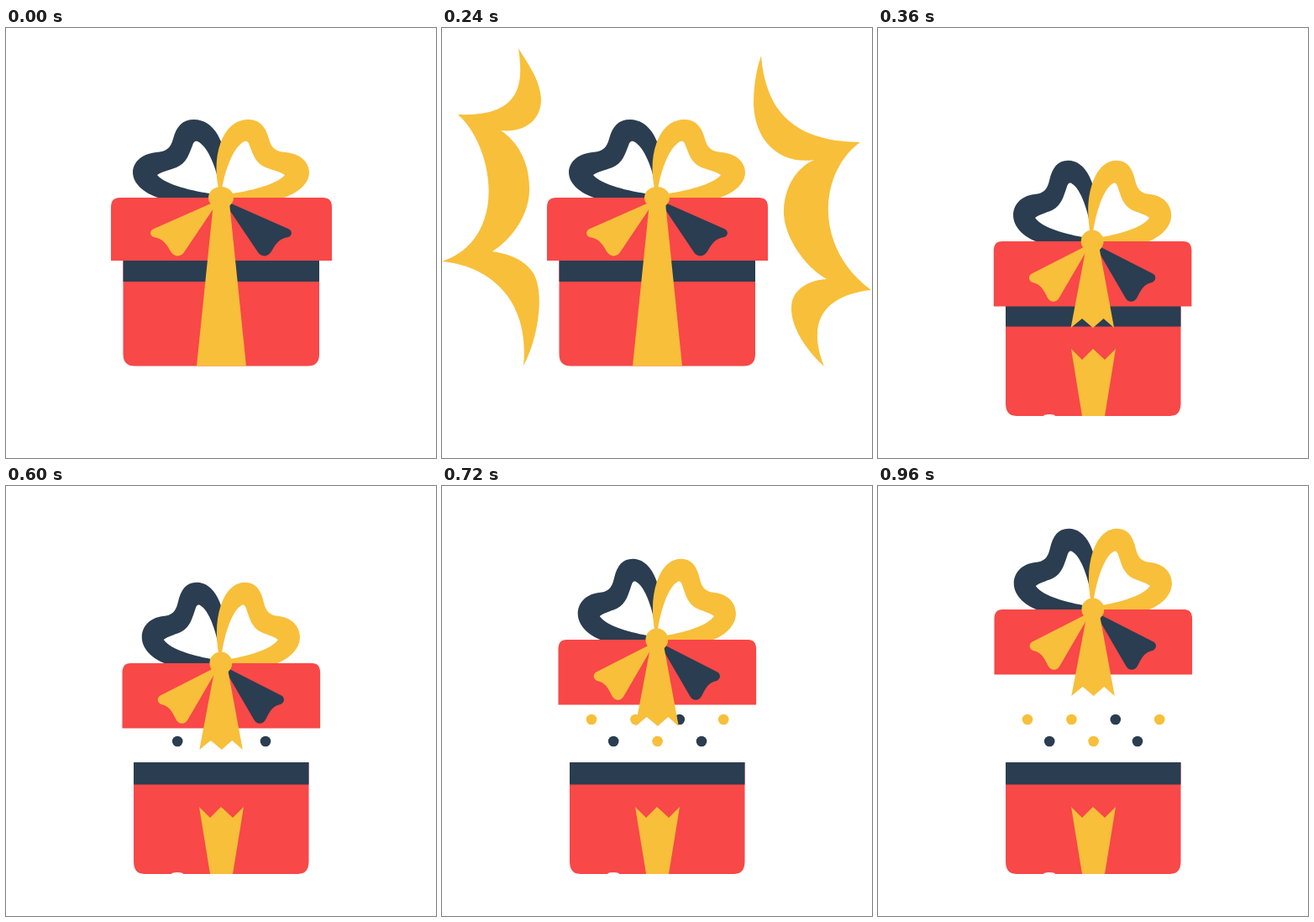
Write an HTML page that moves like this. It is 512 by 512 pixels and loops after 1.08 s.

```html
<!DOCTYPE html>
<html lang="en">
<head>
<meta charset="utf-8">
<title>Gift box</title>
<style>
  html, body { margin: 0; height: 100%; overflow: hidden; background: #fff; }
  svg { display: block; width: 100vw; height: 100vh; }
  .red { fill: #f84848; }
  .gold { fill: #f8bf3a; }
  .navy { fill: #2b3d50; }
</style>
</head>
<body>
<svg viewBox="0 0 512 512">
  <defs>
    <g id="loop">
      <path d="M256 202C249 180 247 150 260 127C267 115 277 109 288 109C302 109 309 117 313 132C316 143 321 147 333 148
        C352 150 361 161 361 172C361 186 346 197 331 202Z"/>
      <path fill="#fff" d="M257 192C261 168 271 141 284 135C287 134 289 136 290 140C294 150 297 161 309 166
        C319 170 327 171 332 175C322 187 290 194 264 198Z"/>
    </g>
    <path id="tail" d="M244 209L175 239.500C171 242 171 247 176 249C187 251 191 257 196 266C200 273 208 273 212 267L249 212Z"/>
  </defs>

  <g id="burst" class="gold">
    <path d="M91 24C97 65 96 106 19 103C61 140 81 250 0 278C57 283 105 324 97 402C115 370 125 305 104 286
      C92 272 72 268 60 266C85 250 105 220 104 190C104 160 90 135 70 122C95 125 118 112 118 85C117 60 100 40 91 24Z"/>
    <path d="M380 33C385 90 410 135 498 136C450 170 440 260 511 312C460 318 432 345 455 403C425 375 412 345 417 325
      C422 308 440 300 458 299C425 280 405 240 407 215C409 185 425 165 443 157C405 163 372 137 371 90C371 70 374 50 380 33Z"/>
  </g>

  <g id="body">
    <path class="red" d="M139.500 277H373V388.500Q373 402.500 359 402.500H153.500Q139.500 402.500 139.500 388.500Z"/>
    <path class="navy" d="M139.500 277H373V302H139.500Z"/>
  </g>

  <g id="inside">
    <path class="gold" d="M230 382L243 395L256 382L270 395L283 382L270 462H243Z"/>
    <ellipse cx="204" cy="462" rx="7" ry="2" fill="#fff"/>
    <g id="dots"></g>
  </g>

  <g id="lid">
    <use href="#loop" class="navy" transform="matrix(-1 0 0 1 512 0)"/>
    <use href="#loop" class="gold"/>
    <path class="red" d="M125 277V213Q125 202 136 202H377Q388 202 388 213V277Z"/>
    <use href="#tail" class="navy" transform="matrix(-1 0 0 1 512 0)"/>
    <use href="#tail" class="gold"/>
    <path id="ribbon" class="gold"/>
    <ellipse class="gold" cx="256" cy="202" rx="15" ry="13"/>
  </g>
</svg>
<script>
const STEP = 120;
const $ = id => document.getElementById(id);
const WHOLE = 'M247 208H266L286 402.500H227Z';
const TORN = 'M248 208H265L285 301.500L271 291L257 301.500L242.500 291L227.500 301.500Z';
const LID_TOPS = [254, 233, 211, 183, 165, 147];
const BURST_SCALES = [0, 0.9, 1];

// Both halves of the opened box are a narrower, taller version of the closed one.
const squash = (x, top, sx, sy) =>
  `translate(${x} ${top}) scale(${sx} ${sy}) translate(-256.300 -202)`;

// Confetti in two staggered rows
for (let i = 0; i < 7; i++) {
  const dot = document.createElementNS('http://www.w3.org/2000/svg', 'circle');
  dot.setAttribute('cx', 178 + i * 26.2);
  dot.setAttribute('cy', i % 2 ? 304 : 278);
  dot.setAttribute('r', 6.3);
  dot.setAttribute('class', [1, 4, 5].includes(i) ? 'navy' : 'gold');
  $('dots').append(dot);
}

function draw(now) {
  const step = Math.floor(now / STEP) % 9;
  const open = step >= 3;
  const scale = open ? 0 : BURST_SCALES[step];
  const top = LID_TOPS[step - 3];

  $('burst').style.display = scale ? '' : 'none';
  $('burst').setAttribute('transform', `translate(256 215) scale(${scale}) translate(-256 -215)`);
  $('inside').style.display = open ? '' : 'none';
  $('body').setAttribute('transform', open ? squash(256.3, 249.6, 0.893, 1.059) : '');
  $('lid').setAttribute('transform', open ? squash(step > 3 ? 256.1 : 255.4, top, 0.896, 1.035) : '');
  $('ribbon').setAttribute('d', open ? TORN : WHOLE);
}

const start = performance.now();
function tick() {
  draw(performance.now() - start);
  requestAnimationFrame(tick);
}
tick();
</script>
</body>
</html>
```
